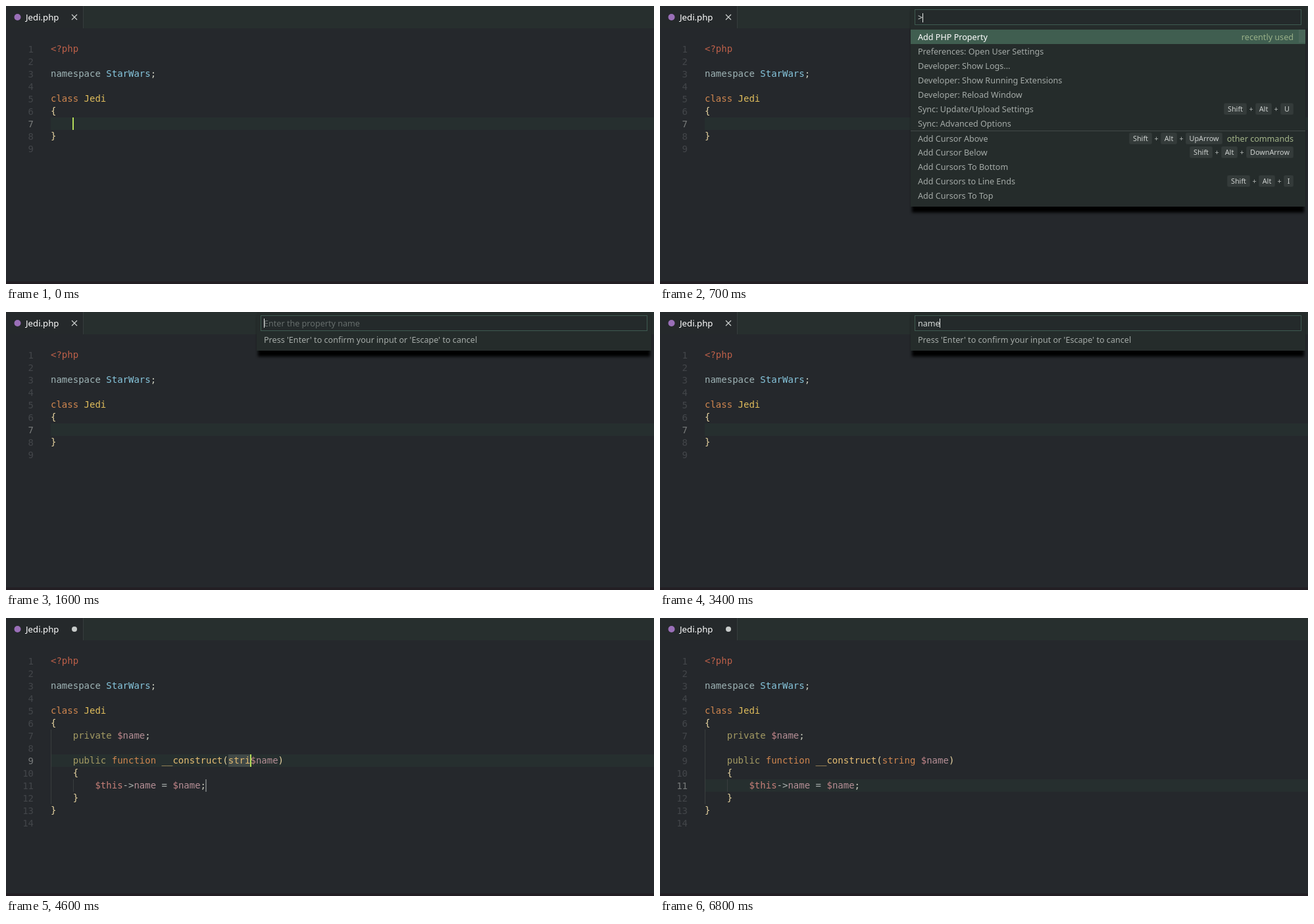
Write an HTML page that moves like this. It is 985 by 424 pixels and loops after 6.9 s.

```html
<!DOCTYPE html>
<html lang="en">
<head>
<meta charset="utf-8">
<title>Add PHP property</title>
<style>
  html, body { margin: 0; width: 100%; height: 100%; overflow: hidden; background: #25282c; }
  svg { display: block; }
  text { white-space: pre; }
  .code { font: 14px "DejaVu Sans Mono", monospace; }
  .ui { font: 12.6px "Noto Sans", sans-serif; }
  .tab { font: 13.2px "Noto Sans", sans-serif; }
  .key { font: 10.8px "Noto Sans", sans-serif; }
  .shadow { filter: blur(2px); }
</style>
</head>
<body>
<svg id="stage" width="985" height="424" viewBox="0 0 985 424"></svg>
<script>
const LOOP = 6900, LEFT = 68, CHAR = 8.4287, ROW = 19, TOP = 56;
const C = {
  tag: '#bd6049', space: '#9fb4b6', name: '#86c5dc', punct: '#c9cbbd', word: '#d0864f',
  type: '#e0bd5c', brace: '#e6d3a0', access: '#a39a63', func: '#e5bd72',
  self: '#c67f78', dollar: '#c5868a', variable: '#b58f96', op: '#a9b0ae'
};
const stage = document.getElementById('stage');
const colX = col => LEFT + col * CHAR;
const rowY = row => TOP + (row - 1) * ROW;

const rect = (x, y, w, h, fill, extra = '') =>
  `<rect x="${x}" y="${y}" width="${w}" height="${h}" fill="${fill}" ${extra}/>`;
const text = (cls, x, y, fill, body, anchor = 'start') =>
  `<text class="${cls}" x="${x}" y="${y}" fill="${fill}" text-anchor="${anchor}">${body}</text>`;
const escape = s => s.replace(/&/g, '&amp;').replace(/</g, '&lt;').replace(/>/g, '&gt;');

// Tokens alternate between a colour name and its text.
function code(row, col, ...tokens) {
  let body = '';
  for (let i = 0; i < tokens.length; i += 2)
    body += `<tspan fill="${C[tokens[i]]}">${escape(tokens[i + 1])}</tspan>`;
  return text('code', colX(col), rowY(row) + 14, C.punct, body);
}
const cursor = (row, col, fill = '#b4dc5a') =>
  rect(Math.floor(colX(col) - 0.3), rowY(row), 2, ROW, fill);
const bracketBox = (row, col) =>
  rect(colX(col) + 0.5, rowY(row) + 0.5, CHAR - 1, ROW - 1, 'none', 'stroke="#66706c"');

function frame(lines, active, dirty) {
  let out = rect(0, 0, 985, 424, '#25282c') + rect(0, 0, 985, 34, '#272f2e')
    + rect(0, 0, 117, 34, '#25292b') + rect(117, 0, 1, 34, '#353c3c')
    + rect(0, 420, 985, 4, '#231f24')
    + '<circle cx="17.5" cy="17" r="5" fill="#9a6fb8"/>'
    + text('tab', 30, 22, '#fff', 'Jedi.php')
    + (dirty ? '<circle cx="104" cy="17" r="4" fill="#c8cbca"/>'
             : '<path d="M100 13l8 8m0-8l-8 8" stroke="#d0d3d2" stroke-width="1.1"/>')
    + rect(LEFT, rowY(active), 917, ROW, '#262f2f');
  for (let n = 1; n <= lines; n++)
    out += text('code', 42, rowY(n) + 15, n === active ? '#777a7a' : '#43464a', n, 'end');
  return out
    + code(1, 0, 'tag', '<?php')
    + code(3, 0, 'space', 'namespace ', 'name', 'StarWars', 'punct', ';')
    + code(5, 0, 'word', 'class ', 'type', 'Jedi')
    + code(6, 0, 'brace', '{')
    + code(lines - 1, 0, 'brace', '}');
}

const emptyClass = showCursor => frame(9, 7, false) + (showCursor ? cursor(7, 4) : '');

function fullClass(t) {
  const hint = t < 4000 ? '' : t < 4300 ? 's' : t < 4400 ? 'st' : t < 4600 ? 'str'
    : t < 4800 ? 'stri' : t < 5000 ? 'string' : 'string ';
  const editing = t < 5800;
  let out = frame(14, editing ? 9 : 11, true)
    + rect(68, rowY(7), 1, 6 * ROW, '#393d3e') + rect(102, rowY(11), 1, ROW, '#393d3e');
  if (editing) {
    out += rect(colX(32), rowY(9), hint.length * CHAR, ROW, '#404947') + cursor(11, 28, '#6b6f70');
    if (!hint) out += bracketBox(9, 31) + bracketBox(9, 37);
  }
  out += code(7, 4, 'access', 'private ', 'dollar', '$', 'variable', 'name', 'punct', ';')
    + code(9, 4, 'access', 'public ', 'word', 'function ', 'func', '__construct', 'brace', '(',
      t < 5000 ? 'func' : 'word', hint, 'dollar', '$', 'variable', 'name', 'brace', ')')
    + code(10, 4, 'brace', '{')
    + code(11, 8, 'self', '$this', 'op', '->', 'variable', 'name', 'op', ' = ',
      'dollar', '$', 'variable', 'name', 'punct', ';')
    + code(12, 4, 'brace', '}');
  if (editing) return out + (t < 5500 ? cursor(9, 32 + hint.length) : '');
  return out + (t < 6300 || (t >= 6700 && t < 6800) ? cursor(11, 28) : '');
}

function popup(height, typed, caretX, caretY, placeholder) {
  return rect(383, 7, 596, height + 2, '#000', 'class="shadow"')
    + rect(381, 0, 600, height, '#252c2b')
    + rect(387.5, 5.5, 587, 23, '#242a2b', 'stroke="#3e5a50"')
    + text('ui', 392, 22, placeholder ? '#666d6c' : '#d5d9d7', escape(typed))
    + (caretX ? rect(caretX, caretY, 1, 14, '#e8eae9') : '');
}

const KEY_WIDTH = { Shift: 35, Alt: 25, U: 20, I: 15, UpArrow: 56, DownArrow: 72 };
function keys(right, y, last) {
  let out = '', x = right;
  for (const key of [last, 'Alt', 'Shift']) {
    const w = KEY_WIDTH[key];
    x -= w;
    out += rect(x + 0.5, y - 8.5, w - 1, 17, '#343b3a', 'rx="2" stroke="#303736"')
      + text('key', x + w / 2, y + 4, '#cdd1cf', key, 'middle');
    if (key !== 'Shift') {
      out += text('key', x - 6.5, y + 4, '#b0b5b3', '+', 'middle');
      x -= 13;
    }
  }
  return out;
}

const COMMANDS = [
  ['Add PHP Property'], ['Preferences: Open User Settings'], ['Developer: Show Logs...'],
  ['Developer: Show Running Extensions'], ['Developer: Reload Window'],
  ['Sync: Update/Upload Settings', 'U'], ['Sync: Advanced Options'],
  ['Add Cursor Above', 'UpArrow', 855], ['Add Cursor Below', 'DownArrow'],
  ['Add Cursors To Bottom'], ['Add Cursors to Line Ends', 'I'], ['Add Cursors To Top']
];
function palette(t) {
  let out = popup(306, '>', t < 1200 ? 399 : 0, 11)
    + rect(381, 36, 600, 22, '#405e50')
    + (t < 800 ? rect(971, 36, 10, 20, '#4a6659') : '')
    + rect(381, 190, 600, 1, '#434a49');
  COMMANDS.forEach(([label, key, right = 963], i) => {
    const y = 47 + 22 * i + (i === 7 ? 1 : 0);
    out += text('ui', 392, y + 5, i ? '#a5aba8' : '#fff', label);
    if (key) out += keys(right, y, key);
  });
  return out + text('ui', 963, 52, '#98b088', 'recently used', 'end')
    + text('ui', 963, 207, '#a3b489', 'other commands', 'end');
}

function prompt(t) {
  const typed = t < 3100 ? 'Enter the property name' : t < 3400 ? 'n' : 'name';
  const caretX = t >= 3400 ? 425 : t >= 3100 ? 399 : t < 2100 || t >= 2600 ? 392 : 0;
  return popup(59, typed, caretX, 10, t < 3100)
    + text('ui', 392, 47, '#a5aba8', "Press 'Enter' to confirm your input or 'Escape' to cancel");
}

function scene(t) {
  if (t < 700) return emptyClass(t < 200);
  if (t < 1600) return emptyClass(false) + palette(t);
  if (t < 3600) return emptyClass(false) + prompt(t);
  if (t < 3700) return emptyClass(true);
  return fullClass(t);
}

let shown = '';
const start = performance.now();
function draw() {
  const next = scene((performance.now() - start) % LOOP);
  if (next !== shown) stage.innerHTML = shown = next;
  requestAnimationFrame(draw);
}
draw();
</script>
</body>
</html>
```
